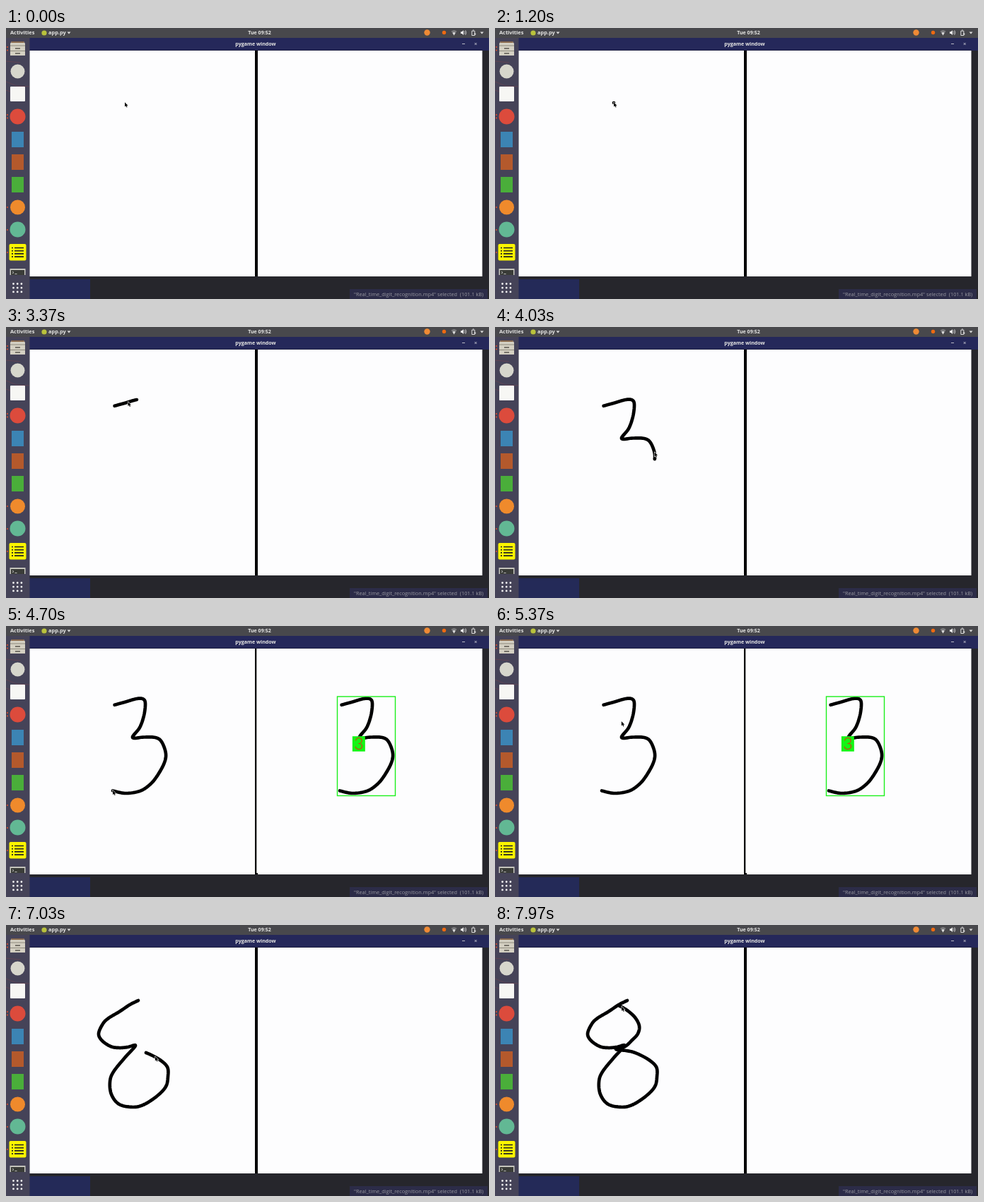
Write an HTML page with a canvas that moves like this. It is 683 px wide and 384 px high and loops after 8000 ms.

```html
<!DOCTYPE html>
<html lang="en">
<head>
<meta charset="utf-8">
<title>Digit drawing</title>
<style>
  html, body { margin: 0; width: 100%; height: 100%; overflow: hidden; background: #26262c; }
  svg, canvas { position: absolute; left: 0; top: 0; width: 683px; height: 384px; }
  text { font: 700 7.4px "Open Sans", "Noto Sans", sans-serif; fill: #e6e6e4; }
  .title { font-size: 7.1px; }
  .status { font-size: 7.3px; font-weight: 400; fill: #9898a0; white-space: pre; }
</style>
</head>
<body>
<svg viewBox="0 0 683 384">
  <!-- desktop -->
  <rect width="683" height="384" fill="#26262c"/>
  <rect x="33" y="356" width="86" height="28" fill="#242a58"/>
  <rect x="486" y="370" width="195" height="14" fill="#2c2c48"/>
  <text class="status" x="492" y="380">"Real_time_digit_recognition.mp4" selected  (101.1 kB)</text>

  <!-- window frame -->
  <rect x="33" y="14" width="650" height="18" fill="#25285a"/>
  <rect x="33" y="31" width="641" height="1" fill="#1e1f42"/>
  <text class="title" x="353" y="25.2" text-anchor="middle">pygame window</text>
  <path d="M645 22.5h4M662.7 21l3 3m0-3l-3 3" stroke="#c8c8d0" stroke-width=".9"/>

  <!-- top bar -->
  <rect width="683" height="14" fill="#48484c"/>
  <text x="6" y="9.4">Activities</text>
  <circle cx="54" cy="7" r="3.6" fill="#b9c23c"/>
  <text x="60" y="9.4">app.py</text>
  <path d="M86.5 5.5h5l-2.5 3z" fill="#ddd"/>
  <text class="title" x="358.5" y="9.4" text-anchor="middle">Tue 09:52</text>
  <circle cx="595.5" cy="6.5" r="4.2" fill="#ef8a35"/>
  <circle cx="619.5" cy="6.5" r="2.7" fill="#ee6a12"/>
  <path d="M629.5 4.5q4-3 8 0l-4 6z" fill="#7c7c7e"/>
  <path d="M631.5 7l2-1 2 1-2 3.5z" fill="#ddd"/>
  <path d="M643 5.3h1.7l2.3-2v6.6l-2.3-2H643z" fill="#eee"/>
  <path d="M648.3 4.5q1.4 2 0 4.2m1.4-5.4q2.2 3.2 0 6.6" fill="none" stroke="#ddd" stroke-width=".8"/>
  <path d="M658.8 4.2h4v6.3h-4zM660 3h1.6" fill="none" stroke="#ddd"/>
  <path d="M663.6 6.2l-1.8 2.6h1.6l-.6 2 2-2.8h-1.5z" fill="#eee"/>
  <path d="M670.5 5.5h5l-2.5 3z" fill="#ddd"/>

  <!-- launcher -->
  <rect y="14" width="33.5" height="370" fill="#454358"/>
  <path d="M0 76l15 6 18 1M0 88l8 3M0 47l20 2" stroke="#6a4352" fill="none" opacity=".7"/>
  <g fill="#e2512f">
    <circle cx="2" cy="27" r="1"/><circle cx="2" cy="31.5" r="1"/>
    <circle cx="2" cy="123" r="1"/><circle cx="2" cy="127.5" r="1"/>
    <circle cx="2" cy="254" r="1"/><circle cx="2" cy="286" r="1"/><circle cx="2" cy="318" r="1"/>
  </g>
  <path d="M8 19h17l2 3v17H6V22z" fill="#d4d0c2"/>
  <path d="M8 19h17l1 2H7z" fill="#8a6a4e"/>
  <path d="M6 25h21M6 32.5h21" stroke="#8d897c"/>
  <path d="M13 28h7v2h-7zM13 35h7v2h-7z" fill="#77736a"/>
  <circle cx="16.5" cy="61.5" r="10" fill="#d6d6cc"/>
  <rect x="6" y="83" width="21" height="21" rx="1" fill="#f7f7f4"/>
  <circle cx="16.5" cy="125.5" r="11" fill="#dc4b3c"/>
  <rect x="8" y="147" width="17" height="22" fill="#3c84b4"/>
  <rect x="8" y="179" width="17" height="22" fill="#b4592c"/>
  <rect x="8" y="211" width="17" height="22" fill="#4aae3a"/>
  <circle cx="16.5" cy="254" r="10.5" fill="#ef8a2c"/>
  <circle cx="16.5" cy="285.5" r="11" fill="#62b894"/>
  <rect x="4.5" y="306" width="24" height="23.5" rx="2" fill="#fbf500"/>
  <path d="M12 311.5h13M12 315.7h13M12 319.9h13M12 324.1h13" stroke="#222" stroke-width="1.6"/>
  <path d="M8 311.5h2M8 315.7h2M8 319.9h2M8 324.1h2" stroke="#222" stroke-width="1.6"/>
  <rect x="5.5" y="341" width="22" height="9" fill="#c4c4bc"/>
  <rect x="7" y="343" width="19" height="7" fill="#3a3c38"/>
  <path d="M9 345l2 1.5-2 1.5M12.5 348.5h3" stroke="#ddd" stroke-width=".8" fill="none"/>
  <path d="M10.5 362.5h12.5M10.5 368.2h12.5M10.5 373.9h12.5" stroke="#f2f2f2"
        stroke-width="2.8" stroke-dasharray="0 5.7" stroke-linecap="round"/>
</svg>
<canvas id="pad" width="683" height="384"></canvas>

<script>
const LOOP = 8000, STEP = 1000 / 30, LAG = 42, COPY_X = 321;
const canvas = document.getElementById('pad');
const ctx = canvas.getContext('2d');
const ratio = window.devicePixelRatio || 1;
canvas.width = 683 * ratio;
canvas.height = 384 * ratio;

const pairs = s => s.split(' ').map(p => p.split(',').map(Number));

// travel: cursor approach; keys: [time, point index] along the stroke
const digits = [
  { label: '1', travel: [0, 0], down: 1200, shown: 2100, clear: 3000,
    keys: [[1370, 0], [1830, 4]],
    points: pairs('168,106 168,136 167,168 166,200 166,228') },
  { label: '3', travel: [2470, 2800], down: 3100, shown: 4700, clear: 5470,
    keys: [[3267, 0], [3367, 2], [3720, 7], [4430, 17]],
    points: pairs('153.6,111.8 170,107.2 185,103 194,103.5 197,110 195,127 189,144 179,158 ' +
      '195,157.5 211,158 220,164 226,181 223,196 212,215 202,226 189,234 169,237 151,233.5') },
  { label: '8', travel: [5000, 5470], down: 5670, shown: LOOP, clear: LOOP,
    keys: [[5830, 0], [6200, 9], [7033, 23], [7967, 32]],
    points: pairs('187,107 175,113 160,123 145,132 137,140 131,154 136,164 148,172 160,174 172,173 ' +
      '183,171 168,188 152,208 147,222 149,240 160,254 180,258 196,254 214,242 226,229 229,215 ' +
      '228,201 216,190 198,181 185,178 171,176 184,172 194,163 202,154 204,143 198,131 187,121 175,114') }
];

const clamp = (v, a, b) => Math.min(b, Math.max(a, v));
const mix = (a, b, k) => a + (b - a) * k;

function progress(keys, t) {
  if (t <= keys[0][0]) return keys[0][1];
  for (let i = 1; i < keys.length; i++) {
    const [t0, u0] = keys[i - 1], [t1, u1] = keys[i];
    if (t <= t1) return mix(u0, u1, (t - t0) / (t1 - t0));
  }
  return keys[keys.length - 1][1];
}

// Catmull-Rom position at fractional index u
function pointAt(pts, u) {
  const last = pts.length - 1;
  const i = clamp(Math.floor(u), 0, last - 1), f = u - i;
  const [a, b, c, d] = [i - 1, i, i + 1, i + 2].map(k => pts[clamp(k, 0, last)]);
  return [0, 1].map(k => b[k] + f / 2 * (c[k] - a[k] +
    f * (2 * a[k] - 5 * b[k] + 4 * c[k] - d[k] + f * (3 * (b[k] - c[k]) + d[k] - a[k]))));
}

function box(color, x, y, w, h) {
  ctx.fillStyle = color;
  ctx.fillRect(x, y, w, h);
}

function drawStroke(pts, end, dx) {
  ctx.beginPath();
  ctx.moveTo(pts[0][0] + dx, pts[0][1]);
  for (let u = 0; u < end; u += 0.1) {
    const [x, y] = pointAt(pts, u);
    ctx.lineTo(x + dx, y);
  }
  const [x, y] = pointAt(pts, end);
  ctx.lineTo(x + dx, y);
  ctx.strokeStyle = '#000';
  ctx.lineWidth = 4.7;
  ctx.lineCap = ctx.lineJoin = 'round';
  ctx.stroke();
}

function drawResult({ label, points }) {
  const xs = points.map(p => p[0]), ys = points.map(p => p[1]);
  const x = Math.min(...xs) - 3.5 + COPY_X, y = Math.min(...ys) - 3;
  const w = Math.max(...xs) + 3.5 + COPY_X - x, h = Math.max(...ys) + 3.5 - y;
  drawStroke(points, points.length - 1, COPY_X);
  ctx.strokeStyle = '#1cf01c';
  ctx.lineWidth = 1.4;
  ctx.lineJoin = 'miter';
  ctx.strokeRect(x, y, w, h);
  const lx = x + w / 3 - 6, ly = y + h / 2 - 14;
  box('#14f514', lx, ly, 18, 21.5);
  ctx.fillStyle = '#e03010';
  ctx.font = '300 23px Lato, sans-serif';
  ctx.fillText(label, lx + 2.3, ly + 19);
}

function cursorAt(t) {
  let n = 0;
  while (n < digits.length - 1 && t >= digits[n + 1].travel[0]) n++;
  const { points, travel: [t0, t1], keys } = digits[n];
  if (n && t < t1) {
    const k = (t - t0) / (t1 - t0), e = k * k * (3 - 2 * k);
    const from = digits[n - 1].points.at(-1);
    return from.map((v, i) => mix(v, points[0][i], e));
  }
  return pointAt(points, progress(keys, t));
}

const arrow = new Path2D('M0 0V6.3L1.5 5L2.5 7.3L3.6 6.8L2.6 4.6H4.5Z');

function drawCursor([x, y]) {
  ctx.save();
  ctx.translate(x, y - 0.7);
  ctx.strokeStyle = '#fff';
  ctx.lineWidth = 1.1;
  ctx.stroke(arrow);
  ctx.fillStyle = '#000';
  ctx.fill(arrow);
  ctx.restore();
}

function render(time) {
  const t = Math.floor((time + 4) / STEP) * STEP;
  const now = t + 4;
  ctx.setTransform(ratio, 0, 0, ratio, 0, 0);
  ctx.clearRect(0, 0, 683, 384);
  box('#fdfdfe', 33.5, 32, 640, 320);
  const digit = digits.find(d => now >= d.down && now < d.clear);
  const shown = digit && now >= digit.shown;
  box('#000', 352, 32, shown ? 2.3 : 4, 320);
  if (shown) box('#000', 354, 350, 2, 2);
  if (digit) drawStroke(digit.points, progress(digit.keys, t), 0);
  if (shown) drawResult(digit);
  drawCursor(cursorAt(t - LAG));
}

const start = performance.now();
function frame() {
  render((performance.now() - start) % LOOP);
  requestAnimationFrame(frame);
}
frame();
</script>
</body>
</html>
```
